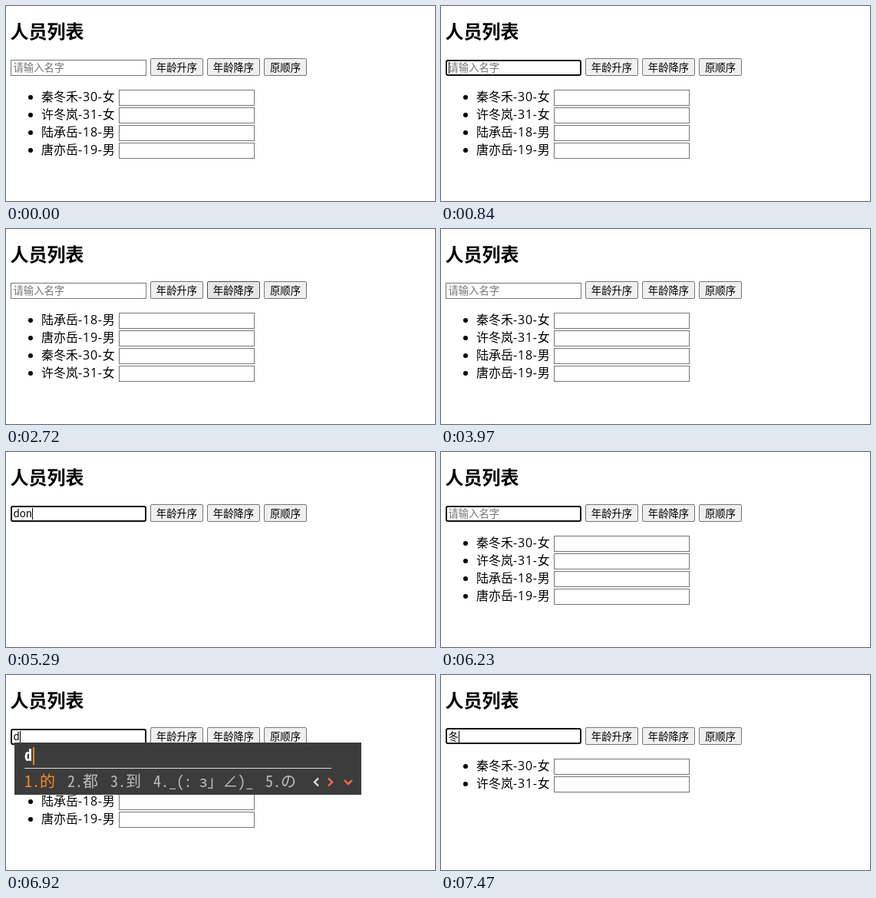
Animation of 559 by 254 pixels, one loop 8 s. Source, as an HTML page:

```html
<!DOCTYPE html>
<html lang="zh-CN">
<head>
<meta charset="utf-8">
<title>人员列表</title>
<style>
html, body { margin: 0; width: 100%; height: 100%; overflow: hidden; background: #fff; }
#stage { position: relative; width: 559px; height: 254px; overflow: hidden; color: #000;
  font: 16px/23px "Noto Sans CJK SC", "Noto Sans CJK", sans-serif; white-space: pre; }
#stage * { box-sizing: border-box; }
.abs, .field, .btn, .name, .dot, .cand { position: absolute; }
h2 { margin: 0; left: 5.5px; top: 19px; font-size: 24px; line-height: 25px; font-weight: 700; }
.field { width: 177px; height: 21px; border: 1px solid #767676; background: #fff; }
.field.focus { border: 2px solid #101010; border-radius: 3px; }
#search { left: 6px; top: 70px; }
#search.raised { top: 69px; }
#text { left: 9.5px; top: 70px; height: 21px; font-size: 13.333px; line-height: 20px; }
#caret { display: inline-block; width: 1px; height: 15px; margin-right: -1px; background: #000; vertical-align: -3px; }
#hint { color: #757575; }
.btn { top: 68px; height: 23px; border: 1px solid #767676; border-radius: 2px; background: #efefef;
  font-size: 13.333px; line-height: 22px; text-align: center; }
.btn.hover { background: #e5e5e5; border-color: #4f4f4f; }
.btn.press { background: #f5f5f5; border-color: #8d8d8d; }
.name { left: 46px; }
.name span { font-family: "Open Sans", sans-serif; letter-spacing: .8px; }
.dot { left: 28.5px; width: 6px; height: 6px; border-radius: 50%; background: #000; }
#ime { left: 11px; top: 88px; height: 68px; background: #3c3c3c; color: #bdbdbd;
  font: 20px/28px "Noto Sans Mono CJK SC", "Noto Sans CJK SC", monospace; }
#typed { left: 13px; top: 2px; color: #fff; font-weight: 700; }
#typed i { display: inline-block; width: 1.5px; height: 23px; margin-left: 1px; background: #ff8a1e; vertical-align: -5px; }
#rule { left: 13px; right: 39px; top: 33px; height: 1px; background: #dcdcdc; }
.cand { top: 36px; }
.cand:first-child { color: #f78c1e; }
#arrows { right: 0; top: 40px; }
</style>
</head>
<body>
<div id="stage">
  <h2 class="abs">人员列表</h2>
  <div id="search" class="field"></div>
  <div id="text" class="abs"><span id="value"></span><i id="caret"></i><span id="hint">请输入名字</span></div>
  <div class="btn" style="left:188px;width:69px">年龄升序</div>
  <div class="btn" style="left:262px;width:69px">年龄降序</div>
  <div class="btn" style="left:336px;width:56px">原顺序</div>
  <div id="list"></div>
  <div id="ime" class="abs">
    <div id="typed" class="abs"><span></span><i></i></div>
    <div id="rule" class="abs"></div>
    <div id="cands"></div>
    <svg id="arrows" class="abs" width="70" height="24" fill="none" stroke="#ff7043" stroke-width="2.4">
      <path d="M14 6.5l-5 5 5 5" stroke="#dedede"/><path d="M27 6.5l5 5-5 5M48 9l5 5 5-5"/>
    </svg>
  </div>
</div>
<script>
const LOOP = 8000;
const people = [['秦冬禾', 30, '女'], ['许冬岚', 31, '女'], ['陆承岳', 18, '男'], ['唐亦岳', 19, '男']];
const BASE = '0123', ASC = '2301', DESC = '1032';

// each step changes only what it names
const steps = [
  [0, { focus: '', value: '', caret: 0, hover: -1, press: -1, order: BASE, ime: '' }],
  [140, { focus: 'search' }], [290, { focus: 'row3' }], [450, { focus: '' }],
  [840, { focus: 'search', caret: 1 }], [1080, { hover: 0 }],
  [1390, { focus: '', caret: 0, press: 0 }], [1470, { press: -1, order: ASC }], [1630, { hover: 1 }],
  [1940, { press: 1 }], [2020, { press: -1, order: DESC }], [2250, { hover: 0 }],
  [2410, { press: 0 }], [2490, { press: -1, order: ASC }], [2640, { hover: -1 }], [2720, { hover: 1 }],
  [3030, { press: 1 }], [3110, { press: -1, order: DESC }], [3340, { hover: -1 }], [3420, { hover: 2 }],
  [3650, { press: 2 }], [3730, { press: -1, order: BASE }], [3970, { hover: -1 }],
  [4430, { focus: 'search' }], [4580, { caret: 1 }],
  [5130, { value: 'd', order: '' }], [5210, { value: 'do' }], [5290, { value: 'don' }], [5440, { value: 'dong' }],
  [5840, { caret: 0 }], [5990, { value: 'don', caret: 1 }], [6070, { value: 'do' }], [6150, { value: 'd' }],
  [6230, { value: '', caret: 0, order: BASE }],
  [6540, { value: 'd', caret: 1, ime: '的 都 到 大 地' }], [6840, { ime: '的 都 到 _(:\u00a0з」∠)_ の' }],
  [7000, { value: 'do', ime: '都 多 到 动 东' }], [7080, { value: 'don', ime: '东 动 懂 冬 洞' }],
  [7160, { value: 'dong', ime: '冬 动 东 冬天 东西' }],
  [7470, { value: '冬', order: '01', ime: '' }]
];
let last = {};
const states = steps.map(([at, patch]) => ({ at, ...(last = { ...last, ...patch }) }));

const $ = id => document.getElementById(id);
const show = (el, on) => { el.style.display = on ? '' : 'none'; };
const buttons = [...document.querySelectorAll('.btn')];
const isWide = c => c >= '\u2000';

const rows = people.map((_, i) => {
  const y = 109 + 23 * i, row = document.createElement('div');
  row.innerHTML = `<div class="dot" style="top:${y + 7}px"></div>
    <div class="name" style="top:${y - 3}px"></div>
    <div class="field" style="left:147px;top:${y}px"></div>`;
  $('list').append(row);
  return { row, name: row.querySelector('.name'), field: row.querySelector('.field') };
});

// narrow glyphs take half an em
const cellWidth = s => [...s].reduce((w, c) => w + (isWide(c) ? 20 : 10), 0);

function drawIme({ value, ime }) {
  show($('ime'), ime);
  if (!ime) return;
  let x = 13;
  $('cands').innerHTML = ime.split(' ').map((word, i) => {
    const label = `${i + 1}.${word}`, left = x;
    x += cellWidth(label) + 16;
    return `<span class="cand" style="left:${left}px">${label}</span>`;
  }).join('');
  $('ime').style.width = x + 69 + 'px';
  $('typed').firstChild.textContent = value;
}

function draw(s) {
  $('search').classList.toggle('focus', s.focus === 'search');
  // taller Chinese text lifts the field by a pixel
  $('search').classList.toggle('raised', [...s.value].some(isWide));
  $('value').textContent = s.value;
  show($('caret'), s.caret);
  show($('hint'), !s.value);
  buttons.forEach((b, i) => {
    b.classList.toggle('hover', s.hover === i);
    b.classList.toggle('press', s.press === i);
  });
  rows.forEach(({ row, name, field }, i) => {
    const p = people[s.order[i]];
    show(row, p);
    if (p) name.innerHTML = `${p[0]}<span>-${p[1]}-</span>${p[2]}`;
    field.classList.toggle('focus', s.focus === 'row' + i);
  });
  drawIme(s);
}

let shown;
function tick() {
  const t = performance.now() % LOOP;
  const state = states.findLast(s => s.at <= t);
  if (state !== shown) draw(shown = state);
  requestAnimationFrame(tick);
}
tick();
</script>
</body>
</html>
```
